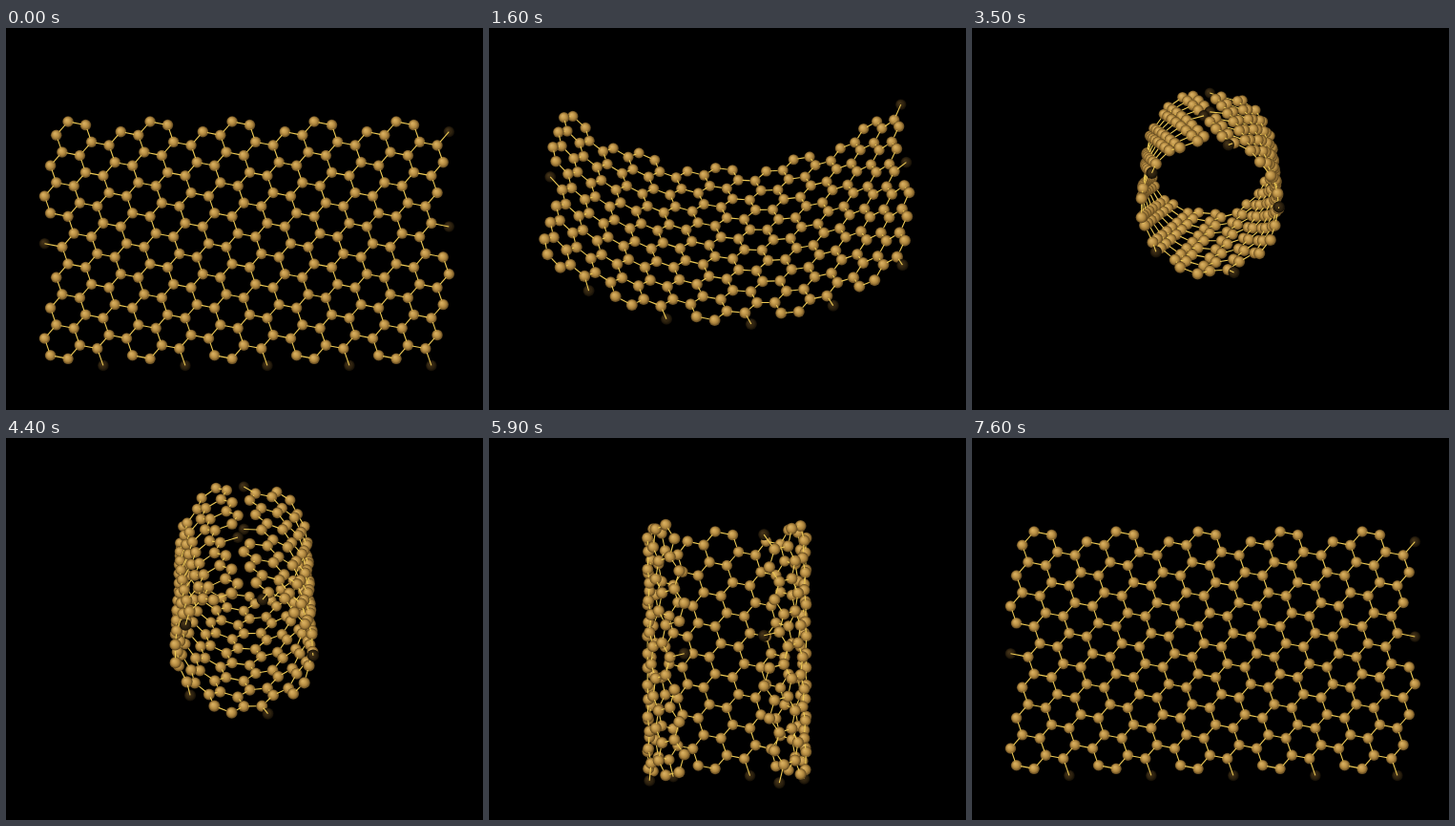
An HTML page with a canvas that plays this animation: 500 px wide and 400 px high, repeating every 7.9 s.

```html
<!DOCTYPE html>
<html lang="en">
<head>
<meta charset="utf-8">
<title>Rolling a carbon sheet into a tube</title>
<style>
  html, body { margin: 0; width: 100%; height: 100%; overflow: hidden; background: #000; }
  canvas { display: block; }
</style>
</head>
<body>
<canvas id="stage" width="500" height="400"></canvas>
<script>
const ctx = document.getElementById('stage').getContext('2d');
const LOOP = 7900, STEP = 100, LAST = 76;
const CX = 249.3, CY = 225.7;      // middle of the sheet on the stage
const U = 86 / 14, V = U / Math.sqrt(3);
const HALF = 35 * U;               // half the circumference
const DIST = 2500;                 // viewing distance
const RADIUS = 5.8, INSET = 4.6;
const RAD = Math.PI / 180;

// [step, degrees]: tilt of the sheet, and half of the rolled arc
const TILT = [[0, 0], [10, 50], [30, 50], [38, 90], [56, 0], [76, 0]];
const ROLL = [[0, 0], [10, 0], [30, 180], [56, 180], [76, 0]];

function track(keys, n) {
  for (let i = 1; i < keys.length; i++) {
    const [a, from] = keys[i - 1], [b, to] = keys[i];
    if (n <= b) return from + (to - from) * (n - a) / (b - a);
  }
  return keys[keys.length - 1][1];
}

// Honeycomb lattice on an integer grid, one full circumference wide
const atoms = [], bonds = [], index = new Map();

function addRow(shift, row) {
  for (let col = -4; col <= 65; col++) {
    if ((col - shift + 1400) % 14) continue;
    const atom = { s: (col - 30) * U, t: (row - 36) * V, col, row, links: 0 };
    index.set(col + ',' + row, atom);
    atoms.push(atom);
  }
}

for (let k = 0; k <= 24; k++) {
  addRow(-5 * k, 3 * k);
  if (k < 24) addRow(-5 * k + 3, 3 * k + 1);
}

for (const a of atoms) {
  if (a.row % 3) continue;
  for (const [dc, dr] of [[3, 1], [-2, 4], [-1, -5]]) {
    const b = index.get((a.col + dc) + ',' + (a.row + dr));
    if (!b) continue;
    bonds.push({ a, b });
    a.links++;
    b.links++;
  }
}

function place(atom, arc, tilt) {
  let x = atom.s, depth = 0;
  if (arc > 0) {
    const r = HALF / arc, angle = atom.s / r;
    x = r * Math.sin(angle);
    depth = r * (1 - Math.cos(angle));
  }
  const c = Math.cos(tilt), s = Math.sin(tilt);
  atom.x = x;
  atom.y = atom.t * c - depth * s;
  atom.z = atom.t * s + depth * c;
}

function project(x, y, z) {
  const k = DIST / (DIST - z);
  return { x: CX + x * k, y: CY + y * k, k };
}

function ballFill(stops) {
  const g = ctx.createRadialGradient(-1.6, -1.8, 0.3, 0, 0, RADIUS);
  stops.forEach((color, i) => g.addColorStop(i / (stops.length - 1), color));
  return g;
}
const gold = ballFill(['#d9b062', '#c89e50', '#a67f3b', '#59421c']);
const dim = ballFill(['#46351a', '#3a2b14', '#2b200e', '#120d05']);

function drawAtom(atom) {
  const p = project(atom.x, atom.y, atom.z);
  ctx.save();
  ctx.translate(p.x, p.y);
  ctx.scale(p.k, p.k);
  ctx.fillStyle = atom.links === 1 ? dim : gold;
  ctx.beginPath();
  ctx.arc(0, 0, RADIUS, 0, 2 * Math.PI);
  ctx.fill();
  ctx.restore();
}

// Point on the bond just inside the surface of its first atom
function bondEnd(from, to) {
  const dx = to.x - from.x, dy = to.y - from.y, dz = to.z - from.z;
  const f = (from.links === 1 ? 0 : INSET) / Math.hypot(dx, dy, dz);
  return project(from.x + dx * f, from.y + dy * f, from.z + dz * f);
}

function drawBond({ a, b }) {
  const p = bondEnd(a, b), q = bondEnd(b, a);
  ctx.beginPath();
  ctx.moveTo(p.x, p.y);
  ctx.lineTo(q.x, q.y);
  ctx.stroke();
}

function render(n) {
  const arc = track(ROLL, n) * RAD, tilt = track(TILT, n) * RAD;
  ctx.fillStyle = '#000';
  ctx.fillRect(0, 0, 500, 400);
  ctx.strokeStyle = '#ecc955';
  ctx.lineWidth = 1.1;
  atoms.forEach(atom => place(atom, arc, tilt));
  const items = atoms.map(atom => ({ z: atom.z, draw: () => drawAtom(atom) }));
  for (const bond of bonds) {
    const { a, b } = bond;
    const z = Math.min(a.links, b.links) === 1 ? Math.max(a.z, b.z) + 0.1 : (a.z + b.z) / 2;
    items.push({ z, draw: () => drawBond(bond) });
  }
  items.sort((p, q) => p.z - q.z);
  items.forEach(item => item.draw());
}

const start = performance.now();
let shown = -1;
function tick() {
  const t = Math.max(0, performance.now() - start) % LOOP;
  const n = Math.min(LAST, Math.floor(t / STEP));
  if (n !== shown) render(shown = n);
  requestAnimationFrame(tick);
}
tick();
</script>
</body>
</html>
```
